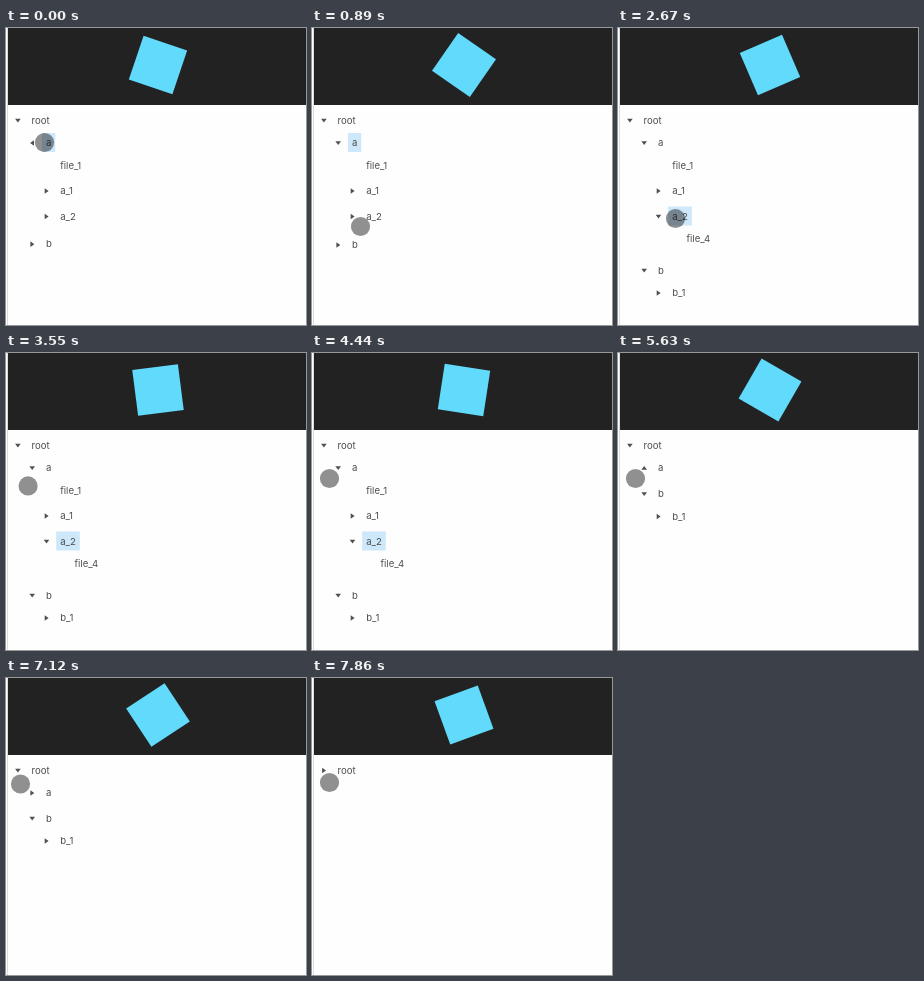
Recreate the animation shown at these times as an HTML page with a canvas. Size 300 px wide and 297 px high, loop 8 s.

```html
<!DOCTYPE html>
<html lang="en">
<head>
<meta charset="utf-8">
<title>File tree</title>
<style>
  html, body { margin: 0; width: 100%; height: 100%; overflow: hidden; background: #fefefe; }
  canvas { display: block; width: 300px; height: 297px; }
</style>
</head>
<body>
<canvas id="stage"></canvas>
<script>
const WIDTH = 300, HEIGHT = 297;
const LOOP = 8000, STEPS = 54;
const SLIDE = 300;                 // duration of opening or closing a folder
const ROW = 22.5, GAP = 3, INDENT = 14.3;
const SPIN = 18 / 1000;            // degrees per ms

// opens / closes: when a folder is toggled; active: when its label is highlighted
const tree = {
  name: 'root', opens: -LOOP, closes: 7350, children: [
    { name: 'a', opens: -280, closes: 5342, active: [-280, 1400], children: [
      { name: 'file_1' },
      { name: 'a_1', children: [] },
      { name: 'a_2', opens: 2364, active: [2364, 5342], children: [{ name: 'file_4' }] },
    ] },
    { name: 'b', opens: 1400, active: [1400, 2364], children: [{ name: 'b_1', children: [] }] },
  ],
};

// time, x, y; equal neighbours are rests
const pointerPath = [
  [0, 38.5, 114.5], [160, 38.5, 114.5], [889, 48.5, 198.5], [1185, 43.5, 217.5],
  [1600, 43.5, 217.5], [2222, 57.5, 190.5], [3000, 57.5, 190.5], [3704, 17.5, 125.5],
  [6000, 17.5, 125.5], [6519, 25.5, 122.5], [7111, 14.5, 106], [7260, 12.5, 104.5],
  [7400, 12.5, 104.5], [7704, 17.5, 104.5], [LOOP, 17.5, 104.5],
];

const canvas = document.getElementById('stage');
const ctx = canvas.getContext('2d');
const scale = window.devicePixelRatio || 1;
canvas.width = WIDTH * scale;
canvas.height = HEIGHT * scale;

const clamp = v => Math.min(1, Math.max(0, v));
const ease = p => 0.5 - Math.cos(Math.PI * clamp(p)) / 2;

function rect(color, x, y, w, h) {
  ctx.fillStyle = color;
  ctx.fillRect(x, y, w, h);
}

function disc(color, x, y, r) {
  ctx.fillStyle = color;
  ctx.beginPath();
  ctx.arc(x, y, r, 0, 2 * Math.PI);
  ctx.fill();
}

function rotated(x, y, degrees, paint) {
  ctx.save();
  ctx.translate(x, y);
  ctx.rotate(degrees * Math.PI / 180);
  paint();
  ctx.restore();
}

// How far the children are slid out, and the arrow's angle in degrees.
function folderState(node, t) {
  const { opens = Infinity, closes = Infinity } = node;
  const closing = t >= closes;
  const age = t - (closing ? closes : opens);
  if (t < opens) return { shown: 0, angle: 0 };
  const p = ease(age / SLIDE);
  // The arrow turns a quarter beyond its rest pose, then snaps back.
  const turn = age < SLIDE ? 90 * p : 0;
  return closing ? { shown: 1 - p, angle: -turn } : { shown: p, angle: 90 + turn };
}

function drawArrow(x, y, angle) {
  rotated(x, y, angle, () => {
    ctx.fillStyle = '#505050';
    ctx.beginPath();
    ctx.moveTo(-1.8, -2.8);
    ctx.lineTo(2.1, 0);
    ctx.lineTo(-1.8, 2.8);
    ctx.fill();
  });
}

function heightOf(node, t) {
  return ROW + GAP + folderState(node, t).shown * contentHeight(node, t);
}

function contentHeight(node, t) {
  return (node.children || []).reduce((sum, child) => sum + heightOf(child, t), 0);
}

function drawNode(node, depth, y, t) {
  const x = 25.6 + depth * INDENT;
  const { shown, angle } = folderState(node, t);
  if (node.active && t >= node.active[0] && t < node.active[1]) {
    rect('#cee8fb', x - 4, y - 9.8, ctx.measureText(node.name).width + 8, 19);
  }
  if (node.children) drawArrow(x - 13.7, y + 0.2, angle);
  ctx.fillStyle = '#4c4c4c';
  ctx.fillText(node.name, x, y + 3.5);

  if (!shown || !node.children.length) return;
  ctx.save();
  ctx.beginPath();
  ctx.rect(0, y + ROW / 2, WIDTH, shown * contentHeight(node, t));
  ctx.clip();
  let childY = y + ROW;
  for (const child of node.children) {
    drawNode(child, depth + 1, childY, t);
    childY += heightOf(child, t);
  }
  ctx.restore();
}

// Smooth curve through the keys that never overshoots them.
function follow(keys, axis, t) {
  const slope = i => keys[i] && keys[i + 1]
    ? (keys[i + 1][axis] - keys[i][axis]) / (keys[i + 1][0] - keys[i][0]) : 0;
  const tangent = i => {
    const before = slope(i - 1), after = slope(i);
    return before * after > 0 ? 2 * before * after / (before + after) : 0;
  };
  const i = keys.findIndex(key => key[0] > t) - 1;
  const from = keys[i], to = keys[i + 1];
  const span = to[0] - from[0];
  const p = (t - from[0]) / span, q = 1 - p;
  return from[axis] * q * q * (1 + 2 * p) + to[axis] * p * p * (1 + 2 * q)
    + span * p * q * (tangent(i) * q - tangent(i + 1) * p);
}

function draw(t) {
  ctx.setTransform(scale, 0, 0, scale, 0, 0);
  ctx.font = '9.6px Inter, Arial, sans-serif';
  rect('#fefefe', 0, 0, WIDTH, HEIGHT);
  rect('#dcdcdc', 1, 0, 1, HEIGHT);
  rect('#222', 2, 0, WIDTH - 2, 77);
  rotated(152, 37, 18.7 + t * SPIN, () => rect('#61dafb', -23, -23, 46, 46));
  drawNode(tree, 0, 92.3, t);
  disc('rgba(0, 0, 0, 0.43)', follow(pointerPath, 1, t), follow(pointerPath, 2, t), 9.6);
}

// The picture advances in even steps.
function frame() {
  const step = Math.floor((performance.now() % LOOP + 6) * STEPS / LOOP) % STEPS;
  draw(step * LOOP / STEPS);
  requestAnimationFrame(frame);
}
frame();
</script>
</body>
</html>
```
